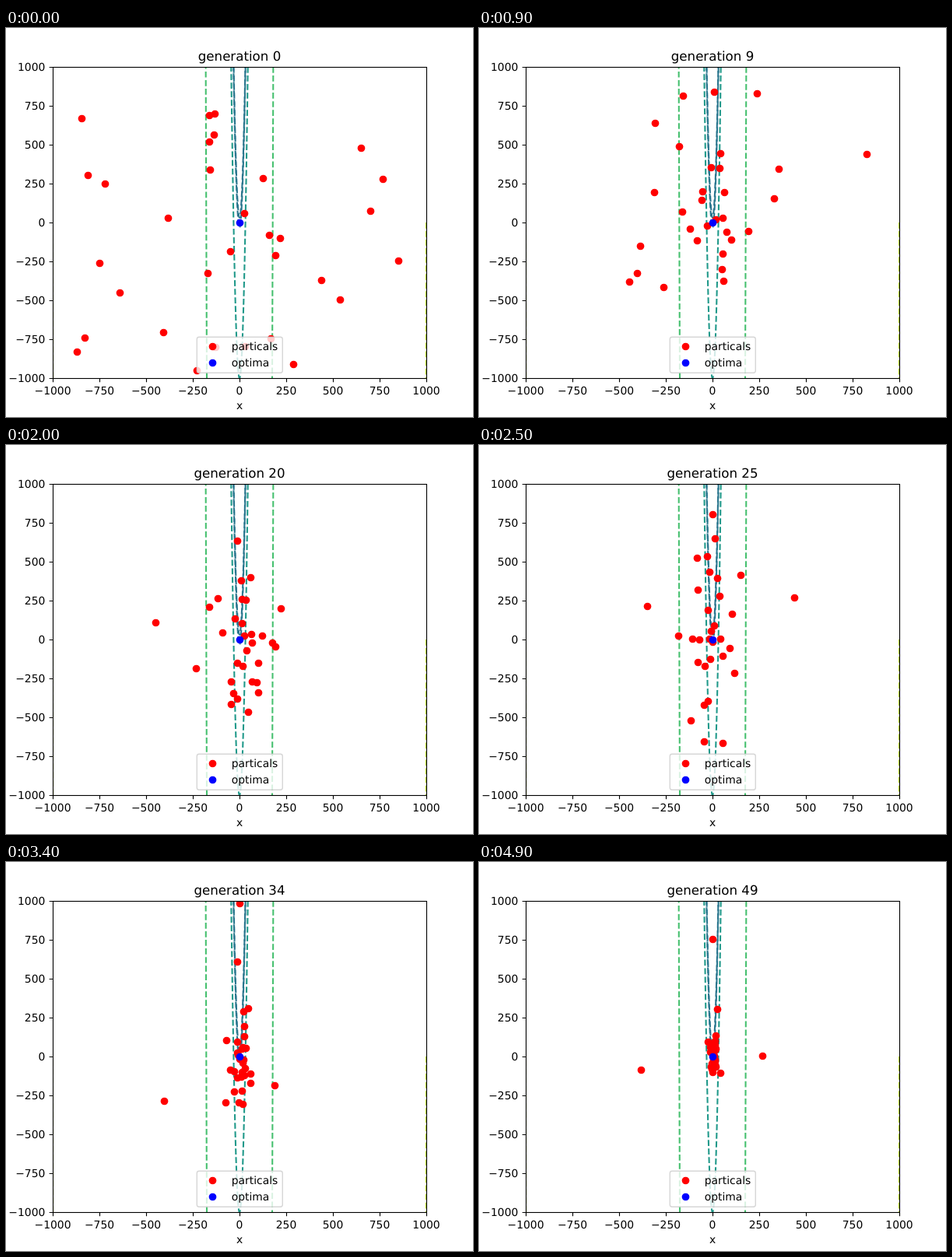
These frames come from a looping animation (600x500 px, 6000 ms). An HTML page:

```html
<!DOCTYPE html>
<html lang="en">
<head>
<meta charset="utf-8">
<title>Particle swarm</title>
<style>
  html, body { margin: 0; width: 100%; height: 100%; overflow: hidden; background: #fff; }
  svg { display: block; width: 600px; height: 500px; }
  text {
    font-family: "DejaVu Sans", Verdana, sans-serif; font-size: 13.89px;
    fill: #000; text-rendering: geometricPrecision;
  }
  .title { font-size: 16.67px; }
  .mid { text-anchor: middle; }
  .end { text-anchor: end; }
  .axis { stroke: #000; stroke-width: 1.11; fill: none; }
  .contour { fill: none; stroke-width: 2.08; stroke-dasharray: 7.71 3.33; }
</style>
</head>
<body>
<svg id="stage" viewBox="0 0 600 500">
  <defs><clipPath id="plot"><rect x="60" y="50" width="480" height="400"/></clipPath></defs>
  <rect width="600" height="500" fill="#fff"/>
  <g clip-path="url(#plot)">
    <g id="contours"></g>
    <g id="swarm" fill="#f00"></g>
    <circle cx="300.5" cy="250.5" r="4.86" fill="#00f"/>
  </g>
  <g id="axes"></g>
  <text id="title" class="title mid" x="300" y="42"></text>
  <text class="mid" x="300" y="490">x</text>
  <rect x="245.3" y="397.3" width="110" height="46" rx="2.8" fill="#fff" fill-opacity=".8"
        stroke="#ccc" stroke-opacity=".8" stroke-width="1.39"/>
  <circle cx="265.5" cy="409.5" r="4.86" fill="#f00"/>
  <circle cx="265.5" cy="430.5" r="4.86" fill="#00f"/>
  <text x="289.7" y="414">particals</text>
  <text x="289.7" y="435">optima</text>
</svg>
<script>
const LOOP = 6000, STEP = 100, LAST = 49, COUNT = 32;
const byId = id => document.getElementById(id);
const toX = x => 300 + x * 0.24;
const toY = y => 250 - y * 0.2;

function add(parent, tag, attrs, text) {
  const el = document.createElementNS("http://www.w3.org/2000/svg", tag);
  for (const key in attrs) el.setAttribute(key, attrs[key]);
  if (text !== undefined) el.textContent = text;
  byId(parent).appendChild(el);
  return el;
}

function drawAxes() {
  add("axes", "rect", { class: "axis", x: 60.5, y: 50.5, width: 480, height: 400 });
  for (let value = -1000; value <= 1000; value += 250) {
    const label = String(value).replace("-", "\u2212");
    const x = toX(value), y = toY(value);
    add("axes", "path", { class: "axis", d: `M${x + 0.5} 450.5v4.86M60.5 ${y + 0.5}h-4.86` });
    add("axes", "text", { class: "mid", x, y: 471 }, label);
    add("axes", "text", { class: "end", x: 50.3, y: y + 5 }, label);
  }
}

// Level curve x² = y + c of the Rosenbrock valley, traced down one arm and up the other
function drawContour(c, color, firstSide) {
  const low = Math.max(-1000, -c), high = Math.min(1000, 1e6 - c), n = 80;
  const closed = c <= 1000;
  let d = "";
  for (let i = -n; i <= n; i++) {
    const side = i < 0 ? firstSide : -firstSide;
    const y = low + (high - low) * (i / n) ** 2;
    const x = side * Math.sqrt(y + c);
    const newArm = i === -n || (i === 0 && !closed);
    d += `${newArm ? "M" : "L"}${toX(x).toFixed(2)} ${toY(y).toFixed(2)}`;
  }
  add("contours", "path", { class: "contour", d, stroke: color });
}

// Repeatable random numbers
function seeded(seed) {
  return () => {
    seed = (seed + 0x6D2B79F5) | 0;
    let t = Math.imul(seed ^ (seed >>> 15), 1 | seed);
    t = (t + Math.imul(t ^ (t >>> 7), 61 | t)) ^ t;
    return ((t ^ (t >>> 14)) >>> 0) / 4294967296;
  };
}

// Where the stragglers end, in data units; the others settle around the optimum
const stragglers = [[0, 755], [25, 305], [-25, 95], [-383, -85], [267, 5], [42, -105]];

const random = seeded(11);
const bell = () => random() + random() + random() - 1.5;
const swarm = Array.from({ length: COUNT }, (_, i) => ({
  start: [random() * 2000 - 1000, random() * 2000 - 1000],
  rest: stragglers[i] || [5 + 16 * bell(), 110 * bell()],
  swing: [0.2 + 0.4 * random(), 0.2 + 0.4 * random()],
}));

// Each particle swings about its rest point while the swing dies away, faster along x
function position({ start, rest, swing }, gen) {
  const fade = 1 - (gen / LAST) ** 2;
  const decay = [fade * Math.exp(-gen / 20), fade];
  return [0, 1].map(k =>
    rest[k] + (start[k] - rest[k]) * decay[k] * Math.cos(swing[k] * gen));
}

drawAxes();
drawContour(-31.62, "#2a768e", -1);
drawContour(31.62, "#2a768e", 1);
drawContour(1000, "#20998a", 1);
// Left arm runs upward, right arm downward
drawContour(31622.8, "#46c06f", 1);
drawContour(1e6, "#bddf26", 1);
const dots = swarm.map(() => add("swarm", "circle", { r: 4.86 }));

let shown = -1;
function render(time) {
  const gen = Math.min(LAST, Math.floor((time % LOOP) / STEP));
  if (gen === shown) return;
  shown = gen;
  byId("title").textContent = "generation " + gen;
  dots.forEach((dot, i) => {
    const [x, y] = position(swarm[i], gen);
    dot.setAttribute("cx", Math.round(toX(x)) + 0.5);
    dot.setAttribute("cy", Math.round(toY(y)) + 0.5);
  });
}

const start = performance.now();
function tick() {
  render(performance.now() - start);
  requestAnimationFrame(tick);
}
render(0);
requestAnimationFrame(tick);
</script>
</body>
</html>
```
